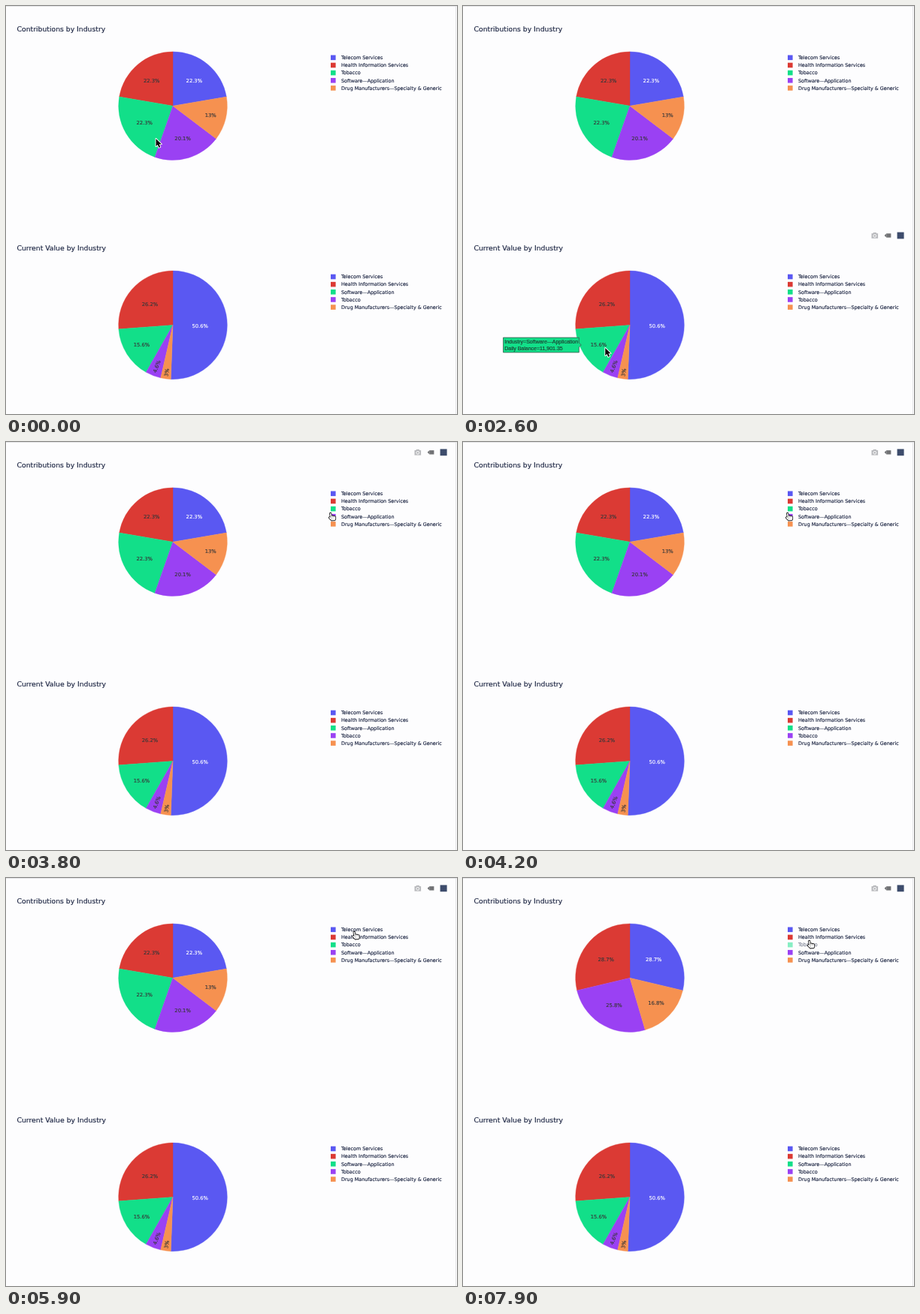
These frames come from a looping animation (600x544 px, 8 s). An HTML page with a canvas:

```html
<!DOCTYPE html>
<html lang="en">
<head>
<meta charset="utf-8">
<title>Industry charts</title>
<style>
html, body { margin: 0; width: 100%; height: 100%; overflow: hidden; background: #fdfdfe; }
canvas { display: block; width: 600px; height: 544px; }
</style>
</head>
<body>
<canvas id="stage"></canvas>
<script>
const W = 600, H = 544, LOOP = 8000, STEP = 100;
const PLOT_GAP = 292.2, TAU = Math.PI * 2;
const SANS = '"DejaVu Sans", Verdana, sans-serif';
const ARIAL = '"Liberation Sans", Arial, sans-serif';
const COLORS = ['#5a58f2', '#db3a34', '#12df89', '#9a41f3', '#f69150'];
const PAPER = '#fdfdfe', INK = '#18213f', LABEL = '#38383a';

const PLOTS = [
  {
    title: 'Contributions by Industry', y: 0,
    labels: ['Telecom Services', 'Health Information Services', 'Tobacco',
      'Software—Application', 'Drug Manufacturers—Specialty & Generic'],
    values: [22.31, 22.31, 22.31, 20.06, 13.02]
  },
  {
    title: 'Current Value by Industry', y: PLOT_GAP,
    labels: ['Telecom Services', 'Health Information Services', 'Software—Application',
      'Tobacco', 'Drug Manufacturers—Specialty & Generic'],
    values: [50.6, 26.2, 15.6, 4.6, 3]
  }
];

// Each stop of the pointer: when it arrives and how long it travels there.
const STOPS = [
  { at: 0, travel: 0, x: 199.5, y: 177 },
  { at: 1300, travel: 1000, x: 210.5, y: 439 },
  { at: 2700, travel: 700, x: 188, y: 457 },
  { at: 3800, travel: 500, x: 431.5, y: 94 },
  { at: 5000, travel: 600, x: 463, y: 71 },
  { at: 6100, travel: 200, x: 461, y: 84 },
  { at: 6700, travel: 400, x: 472.5, y: 388.5 },
  { at: 7800, travel: 500, x: 460.5, y: 83 }
];

const canvas = document.getElementById('stage');
const ctx = canvas.getContext('2d');
const dpr = window.devicePixelRatio || 1;
canvas.width = W * dpr;
canvas.height = H * dpr;

const between = (t, a, b) => t >= a && t < b;

function ease(u) {
  u = Math.max(0, Math.min(1, u));
  return u * u * (3 - 2 * u);
}

function pointerAt(t) {
  let { x, y } = STOPS[0];
  for (const stop of STOPS.slice(1)) {
    const k = ease((t - stop.at + stop.travel) / stop.travel);
    x += (stop.x - x) * k;
    y += (stop.y - y) * k;
  }
  return { x, y };
}

function text(str, x, y, size, color, font = SANS, align = 'left') {
  ctx.font = `${size}px ${font}`;
  ctx.textAlign = align;
  ctx.fillStyle = ctx.strokeStyle = color;
  ctx.lineWidth = 0.15;
  ctx.fillText(str, x, y);
  ctx.strokeText(str, x, y);
}

function box(x, y, w, h, color) {
  ctx.fillStyle = color;
  ctx.fillRect(x, y, w, h);
}

function polygon(points) {
  ctx.beginPath();
  points.forEach(([x, y]) => ctx.lineTo(x, y));
  ctx.closePath();
}

function drawSlice(cx, cy, r, { start, size, color }) {
  const top = Math.PI / 2;
  ctx.beginPath();
  ctx.moveTo(cx, cy);
  ctx.arc(cx, cy, r, start - top, start + size - top);
  ctx.closePath();
  ctx.fillStyle = ctx.strokeStyle = color;
  ctx.lineWidth = 0.4;
  ctx.lineJoin = 'round';
  ctx.fill();
  ctx.stroke();
}

function drawShare(cx, cy, r, { start, size, color, share }) {
  const mid = start + size / 2;
  const narrow = share < 0.08;
  const inscribed = Math.min(1 / (1 + 1 / Math.sin(size / 2)), 0.5);
  const dist = r * (narrow ? 1 - share * 3.9 : 1 - inscribed);
  ctx.save();
  ctx.translate(cx + Math.sin(mid) * dist, cy - Math.cos(mid) * dist);
  if (narrow) ctx.rotate(mid - TAU * 0.75);
  const label = +(share * 100).toFixed(1) + '%';
  text(label, 0, 2.5, 6.75, color === COLORS[0] ? '#fff' : LABEL, SANS, 'center');
  ctx.restore();
}

// The first slice runs clockwise from the top, the rest counter-clockwise.
function drawPie(plot, hidden) {
  const pie = [222, 133.2 + plot.y, 72.3];
  const shown = COLORS.map((_, i) => i).filter(i => i !== hidden);
  const total = shown.reduce((sum, i) => sum + plot.values[i], 0);
  let edge = 0;
  const slices = shown.map((i, n) => {
    const share = plot.values[i] / total, size = share * TAU;
    if (n) edge -= size;
    return { start: edge, size, color: COLORS[i], share };
  });
  slices.forEach(s => drawSlice(...pie, s));
  slices.forEach(s => drawShare(...pie, s));
}

function drawLegend(plot, hidden) {
  plot.labels.forEach((label, i) => {
    const y = 68.8 + plot.y + i * 10.15;
    ctx.globalAlpha = i === hidden ? 0.5 : 1;
    box(432, y - 3.3, 6.6, 6.6, COLORS[i]);
    text(label, 446, y + 2.3, 6.42, INK);
    ctx.globalAlpha = 1;
  });
}

function drawToolbar(dy) {
  ctx.save();
  ctx.translate(0, dy);
  box(543.5, 11, 8.6, 6.6, '#b9babd');
  box(545.7, 9.8, 4.2, 2, '#b9babd');
  ctx.strokeStyle = PAPER;
  ctx.lineWidth = 1;
  ctx.beginPath();
  ctx.arc(547.8, 14.3, 1.9, 0, TAU);
  ctx.stroke();
  box(563.4, 11.1, 6, 5.4, '#717275');
  polygon([[560.6, 13.8], [563.5, 11.1], [563.5, 16.5]]);
  ctx.fill();
  box(577.6, 9.4, 9, 8.8, '#3d4c6c');
  ctx.restore();
}

function drawTooltip() {
  const left = 53.5, right = 154.3, mid = 452, half = 9.9, tip = 3;
  polygon([
    [left, mid - half], [right, mid - half], [right, mid - tip], [right + tip, mid],
    [right, mid + tip], [right, mid + half], [left, mid + half]
  ]);
  ctx.fillStyle = COLORS[2];
  ctx.fill();
  ctx.strokeStyle = '#3f5a50';
  ctx.lineWidth = 0.8;
  ctx.stroke();
  ['Industry=Software—Application', 'Daily Balance=11,901.35'].forEach((line, i) =>
    text(line, left + 1.7, 450.3 + i * 9, 7, '#1d3b30', ARIAL));
}

function drawArrow() {
  polygon([[0, 0], [0, 10], [2.3, 8], [4, 11.8], [5.8, 11], [4.2, 7.3], [7.3, 7.2]]);
  ctx.strokeStyle = '#fff';
  ctx.lineWidth = 1.8;
  ctx.stroke();
  ctx.fillStyle = '#080808';
  ctx.fill();
}

// Fingers, thumb and palm are thick round strokes: dark first, then white.
function drawHand() {
  const line = (x0, y0, x1, y1) => {
    ctx.moveTo(x0, y0);
    ctx.lineTo(x1, y1);
  };
  ctx.beginPath();
  line(0.2, 1.4, 1.2, 8);
  for (let i = 0; i < 3; i++) line(2.6 + i * 1.7, 5 + i * 0.4, 3 + i * 1.5, 9);
  line(-1, 6.9, 2, 9.8);
  line(2, 9.6, 5.6, 9.6);
  ctx.lineCap = 'round';
  for (const [color, width] of [['#171719', 3.2], ['#fff', 1.5]]) {
    ctx.strokeStyle = color;
    ctx.lineWidth = width;
    ctx.stroke();
  }
}

function drawPointer({ x, y }) {
  const onLegend = PLOTS.some(p => between(x, 429, 582) && between(y - p.y, 63, 115));
  ctx.save();
  ctx.translate(x, y);
  ctx.lineJoin = 'round';
  (onLegend ? drawHand : drawArrow)();
  ctx.restore();
}

function hiddenAt(t) {
  if (between(t, 5100, 5900)) return 0;
  return t >= 6200 ? 2 : -1;
}

function draw(t) {
  const pointer = pointerAt(t);
  ctx.setTransform(dpr, 0, 0, dpr, 0, 0);
  box(0, 0, W, H, PAPER);
  box(0, 0, W, 1, '#e5e5e7');
  box(598, 0, 1, H, '#e5e5e7');

  PLOTS.forEach((plot, i) => {
    const hidden = i ? -1 : hiddenAt(t);
    text(plot.title, 14.5, 33.9 + plot.y, 9.28, INK);
    drawPie(plot, hidden);
    drawLegend(plot, hidden);
  });

  if (t >= 2500) drawToolbar(pointer.y < PLOT_GAP ? 0 : PLOT_GAP);
  if (between(t, 2600, 3400)) drawTooltip();
  drawPointer(pointer);
}

function tick() {
  const t = performance.now() % LOOP;
  draw(Math.floor(t / STEP) * STEP);
  requestAnimationFrame(tick);
}
tick();
</script>
</body>
</html>
```
